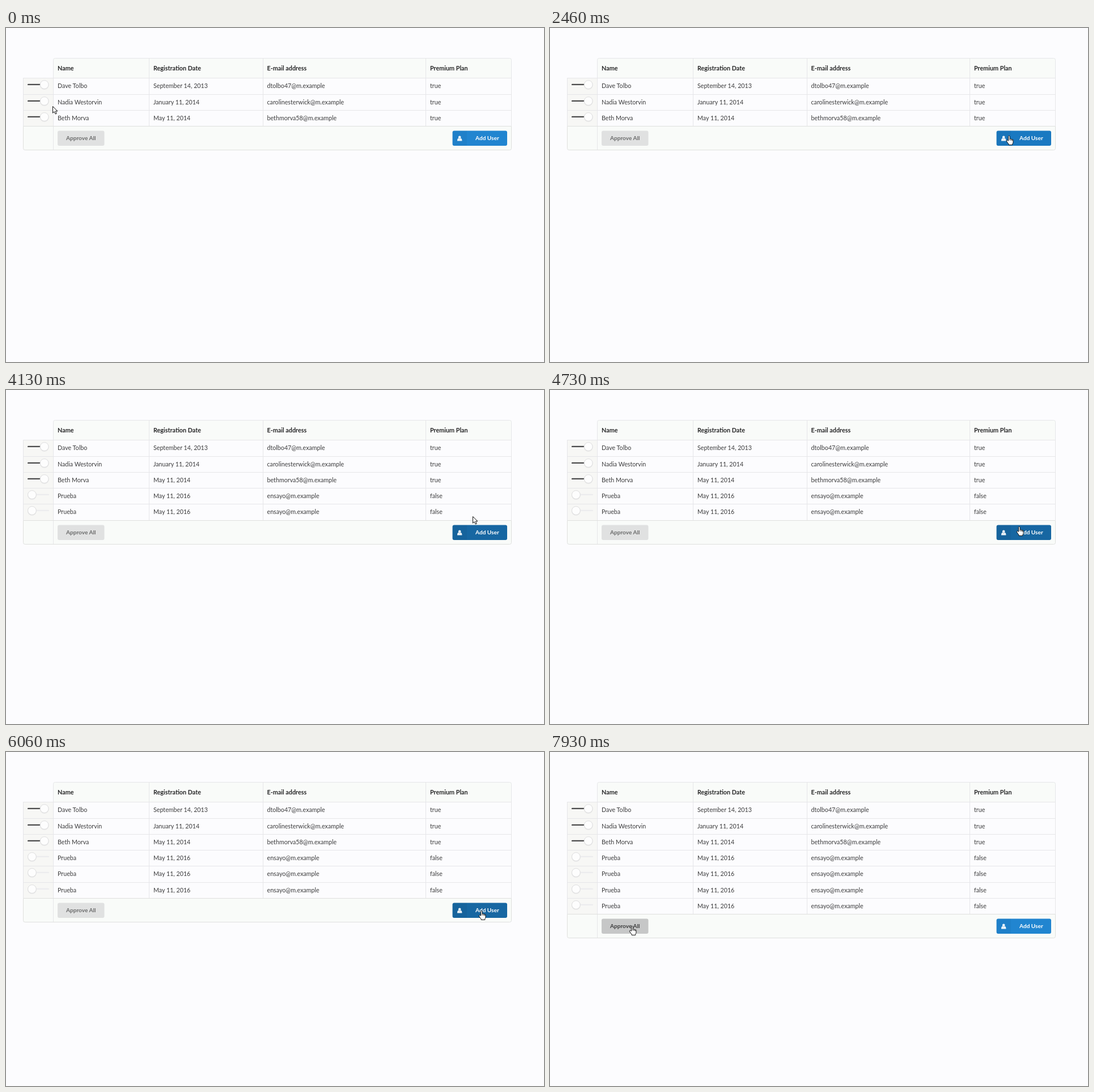
These frames come from a looping animation (949 px wide and 590 px high, 8 s). An HTML page:

```html
<!DOCTYPE html>
<html lang="en">
<head>
<meta charset="utf-8">
<title>User table</title>
<style>
  html, body { margin: 0; width: 100%; height: 100%; overflow: hidden; background: #fcfcfe; }
  svg { display: block; width: 949px; height: 590px; font: 10.7px Lato, sans-serif; cursor: default; user-select: none; }
  text { fill: #3c3c3d; }
  .head { font-size: 10.8px; font-weight: 700; fill: #252526; }
  .label { font-size: 10.1px; font-weight: 700; }
  .line { fill: #e6e6e9; shape-rendering: crispEdges; }
  .panel { fill: #f9fbf9; }
  .side { fill: #f7f7f5; }
  .knob { fill: #fdfdfd; stroke: #dededf; }
  .pointer { fill: #fff; stroke: #111; stroke-linejoin: round; }
  #approve rect { fill: #e0e1e1; }
  #approve text { fill: #6b6c6c; }
  #approve.over rect { fill: #c6c7c7; }
  #approve.over text { fill: #3d3d3e; }
  #add rect { fill: #2185d0; }
  #add text { fill: #fff; }
  #add.over rect { fill: #1a79c1; }
  #add.focus rect { fill: #1767a2; }
</style>
</head>
<body>
<svg viewBox="0 0 949 590">
  <g id="table"></g>
  <g id="footer">
    <path class="panel" d="M30.5 173.5H891.5V212.5a3 3 0 0 1-3 3H33.5a3 3 0 0 1-3-3Z" stroke="#dfe0de"/>
    <rect class="line" x="83" y="174" width="1" height="41"/>
    <g id="approve">
      <rect x="91" y="181.6" width="82.5" height="26.3" rx="3"/>
      <text class="label" x="106" y="198">Approve All</text>
    </g>
    <g id="add">
      <rect x="787.6" y="181.6" width="96.4" height="26.3" rx="3"/>
      <path d="M813 181.6v26.3H790.6a3 3 0 0 1-3-3v-20.3a3 3 0 0 1 3-3Z" opacity=".03"/>
      <g fill="#fff" opacity=".92">
        <ellipse cx="800.2" cy="193" rx="2.3" ry="2.6"/>
        <path d="M796 199.6v-1.6q0-2.8 2.2-3.2q2 1.7 4 0q2.2.4 2.2 3.2v1.6Z"/>
      </g>
      <text class="label" x="828" y="198">Add User</text>
    </g>
  </g>
  <g id="cursor" class="pointer">
    <path id="arrow" d="M.5.5V12.2L3.2 9.7L5.2 14L7.2 13.1L5.3 8.9H8.9Z"/>
    <path id="hand" d="M-1.5 9V1.6Q-1.5.5-.3.5T1 1.6V5.8Q2.8 5 3.4 6.4Q4.9 5.7 5.5 7.1Q7 6.7 7 8.3V11.5Q7 13.5 5.8 14.7V16.4H-.9V15Q-3.2 12.4-4.6 9.8Q-4.9 8.3-3.5 8.2Q-2.5 8.2-1.5 9.6M1 5.8V8.6M3.4 6.4V8.9M5.5 7.1V9.3"/>
  </g>
</svg>
<script>
const $ = id => document.getElementById(id);
const LOOP = 8000, STEP = 200 / 3, PITCH = 28.25;
const START_ROWS = 3, ADDED = 4, FIRST_CLICK = 3055, CLICK_GAP = 16 * STEP;
const columns = [91, 260, 460.5, 748];
const edges = [83, 252, 453, 740, 891];
const people = [
  ["Dave Tolbo", "September 14, 2013", "dtolbo47@m.example", "true"],
  ["Nadia Westorvin", "January 11, 2014", "carolinesterwick@m.example", "true"],
  ["Beth Morva", "May 11, 2014", "bethmorva58@m.example", "true"],
  ...Array(ADDED).fill(["Prueba", "May 11, 2016", "ensayo@m.example", "false"])
];

// Pointer tip: time, x, y
const path = [
  [0, 82, 138], [1000, 80, 160], [1460, 468, 170], [1900, 797, 201],
  [2660, 815, 186], [3130, 821, 193], [4130, 823, 223], [6460, 842, 291],
  [6900, 600, 334], [7730, 145, 307], [LOOP, 145, 307]
];

const rect = (cls, x, y, w, h) => `<rect class="${cls}" x="${x}" y="${y}" width="${w}" height="${h}"/>`;
const cells = (values, y, cls = "") =>
  values.map((v, i) => `<text class="${cls}" x="${columns[i]}" y="${y}">${v}</text>`).join("");
const verticals = (xs, y, h) => xs.map(x => rect("line", x, y, 1, h)).join("");
const rowTop = i => Math.round(88.3 + PITCH * i);

function toggle(cy, on) {
  const knobX = on ? 67.7 : 45.9;
  return `<rect x="${on ? 38 : 46}" y="${cy - 1.3}" width="30" height="2.4" rx="1.2" fill="${on ? "#4b4b4c" : "#ececee"}"/>
    <circle cx="${knobX}" cy="${cy + .8}" r="7.9" fill="#e6e6e6"/>
    <circle class="knob" cx="${knobX}" cy="${cy}" r="7.4"/>`;
}

function row(person, i) {
  const y = rowTop(i), h = rowTop(i + 1) - y, shift = y - rowTop(0);
  return `<g class="row">${rect("side", 31, y, 52, h)}${verticals([30, ...edges], y, h)}
    ${rect("line", 30, y, 862, 1)}${toggle(100 + shift, person[3] === "true")}
    ${cells(person, 106.2 + shift)}</g>`;
}

$("table").innerHTML =
  `<path class="panel" d="M83.5 88.5V56.5a3 3 0 0 1 3-3H888.5a3 3 0 0 1 3 3V88.5" stroke="#e6e6e9"/>`
  + verticals(edges.slice(1, 4), 54, 34)
  + cells(["Name", "Registration Date", "E-mail address", "Premium Plan"], 75, "head")
  + people.map(row).join("");
const rows = document.querySelectorAll(".row");

function pointerAt(t) {
  const i = path.findIndex(k => k[0] > t);
  const [t0, x0, y0] = path[i - 1], [t1, x1, y1] = path[i];
  const p = (t - t0) / (t1 - t0);
  return [x0 + (x1 - x0) * p, y0 + (y1 - y0) * p].map(Math.round);
}

const show = (el, on) => el.setAttribute("display", on ? "inline" : "none");

function draw(now) {
  const t = Math.floor((now % LOOP + 7) / STEP) * STEP % LOOP;
  const clicks = Math.floor((t - FIRST_CLICK) / CLICK_GAP) + 1;
  const added = Math.max(0, Math.min(ADDED, clicks));
  const drop = rowTop(START_ROWS + added) - rowTop(START_ROWS);
  const [x, y] = pointerAt(t);
  const inBar = y >= 181 + drop && y <= 208 + drop;
  const overApprove = inBar && x >= 91 && x <= 174;
  const overAdd = inBar && x >= 787 && x <= 884;

  rows.forEach((r, i) => show(r, i < START_ROWS + added));
  $("footer").setAttribute("transform", `translate(0 ${drop})`);
  $("approve").classList.toggle("over", overApprove);
  $("add").classList.toggle("over", overAdd);
  $("add").classList.toggle("focus", added > 0 && x > 787);
  $("cursor").setAttribute("transform", `translate(${x} ${y})`);
  show($("hand"), overApprove || overAdd);
  show($("arrow"), !overApprove && !overAdd);
}

const start = performance.now();
function tick() {
  draw(performance.now() - start);
  requestAnimationFrame(tick);
}
tick();
</script>
</body>
</html>
```
